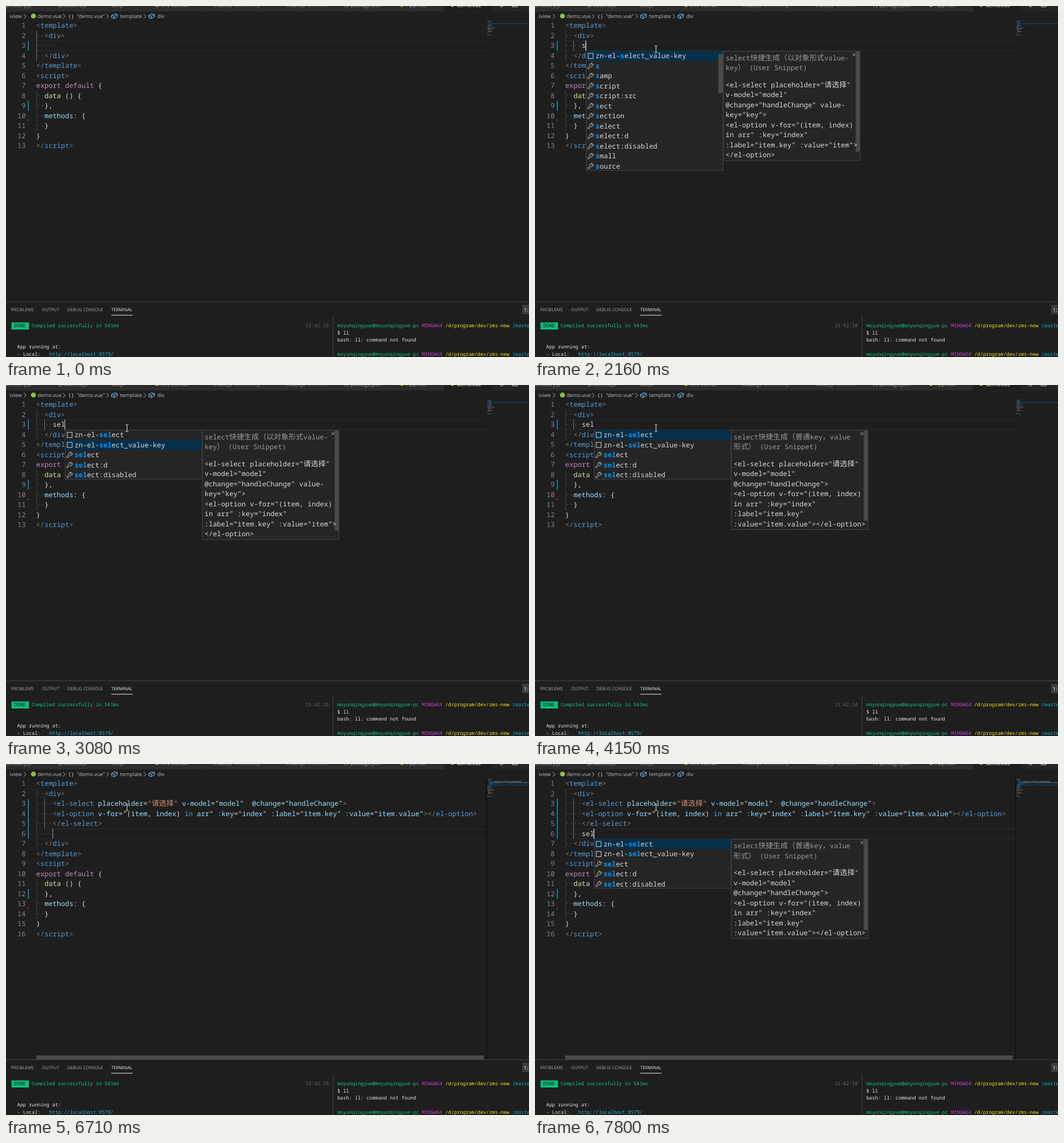
Recreate the animation shown at these times as an HTML page with a canvas. Size 914 px wide and 613 px high, loop 8000 ms.

```html
<!DOCTYPE html>
<html lang="en">
<head>
<meta charset="utf-8">
<title>Snippet completion</title>
<style>
html, body { margin: 0; width: 100%; height: 100%; overflow: hidden; background: #1e1e1e; }
canvas { display: block; }
</style>
</head>
<body>
<canvas id="stage" width="914" height="613"></canvas>
<script>
const ctx = document.getElementById('stage').getContext('2d');
const LOOP = 8000, ROW = 17.5, CODE_X = 52.8, COL = 7.2;
const INSERT = 4610, NEWLINE = 5460;
const MONO = '"Noto Sans Mono", "Noto Sans CJK SC", "Noto Sans CJK", monospace';
const CJK = '"Noto Sans CJK SC", "Noto Sans CJK", sans-serif';
const UI = '"Open Sans", "Noto Sans", sans-serif';
const COLORS = {
  g: '#808080', b: '#569cd6', a: '#9cdcfe', s: '#ce9178',
  w: '#d8d8d8', p: '#c586c0', y: '#dcdcaa', d: '#5a5a5a'
};

// "~k" starts a run in colour k; "·" is a visible space.
const HEAD = ['~g<~btemplate~g>', '~d··~g<~bdiv~g>'];
const TAIL = [
  '~d··~g</~bdiv~g>', '~g</~btemplate~g>', '~g<~bscript~g>',
  '~pexport default ~w{', '~d··~ydata ~w() {', '~d··~w},',
  '~d··~amethods: ~w{', '~d··~w}', '~w}', '~g</~bscript~g>'
];
const SNIPPET = [
  '~d····~g<~bel-select ~aplaceholder~w=~s"请选择" ~av-model~w="~amodel~w"~d··~a@change~w="~ahandleChange~w"~g>',
  '~d····~g<~bel-option ~av-for~w="(~aitem~w, ~aindex~w) ~bin ~aarr~w" ~a:key~w="~aindex~w" ~a:label~w="~aitem.key~w" ~a:value~w="~aitem.value~w"~g></~bel-option~g>',
  '~d····~g</~bel-select~g>'
];
const SUGGESTIONS = [
  'zn-el-select', 'zn-el-select_value-key', 's', 'samp', 'script', 'script:src', 'sect',
  'section', 'select', 'select:d', 'select:disabled', 'small', 'source'
];
const DETAILS = [
  ['select快捷生成（普通key，value', '形式） (User Snippet)', '<el-select placeholder="请选择"',
    'v-model="model"', '@change="handleChange">', '<el-option v-for="(item, index)',
    'in arr" :key="index"', ':label="item.key"', ':value="item.value"></el-option>'],
  ['select快捷生成（以对象形式value-', 'key） (User Snippet)', '<el-select placeholder="请选择"',
    'v-model="model"', '@change="handleChange" value-', 'key="key">',
    '<el-option v-for="(item, index)', 'in arr" :key="index"',
    ':label="item.key" :value="item">', '</el-option>']
];

// Step tracks: [start time, value]
const TYPED = [[0, ''], [2080, 's'], [2310, 'se'], [2455, 'sel'], [INSERT, ''],
  [7250, 's'], [7490, 'se'], [7730, 'sel']];
const QUERY = [[0, ''], [2160, 's'], [2380, 'se'], [2530, 'sel'], [INSERT, ''],
  [7330, 's'], [7570, 'se'], [7800, 'sel']];
const CARET = [[0, 0], [1150, 1], [1780, .66], [1855, .33], [1930, 0], [2080, 1],
  [3080, .7], [3160, 0], [3540, .5], [3620, 1], [4080, .5], [4150, 0], [INSERT, 1],
  [5230, .5], [5300, 0], [NEWLINE, 1], [6080, .66], [6155, .33], [6230, 0],
  [6710, .5], [6780, 1], [7090, .5], [7170, 0], [7250, 1]];

const at = (track, t) => track.reduce((v, [start, next]) => t >= start ? next : v, track[0][1]);
const rowTop = n => 8 + ROW * n;

function rect(x, y, w, h, color) {
  ctx.fillStyle = color;
  ctx.fillRect(x, y, w, h);
}

function dot(x, y, r, color) {
  ctx.fillStyle = color;
  ctx.beginPath();
  ctx.arc(x, y, r, 0, 7);
  ctx.fill();
}

function path(points, color, width = 1, close = false) {
  ctx.strokeStyle = color;
  ctx.lineWidth = width;
  ctx.beginPath();
  points.forEach(([x, y]) => ctx.lineTo(x, y));
  if (close) ctx.closePath();
  ctx.stroke();
}

function label(text, x, y, color, size = 9.1) {
  ctx.font = `${size}px ${UI}`;
  ctx.fillStyle = color;
  ctx.fillText(text, x, y);
}

// Draws on a fixed pitch and returns the x where the text ends.
function mono(text, x, y, color, size = 12, weight = 400) {
  const wide = size * 1.078;
  for (const ch of text) {
    const isWide = ch > '\u2fff';
    if (ch === '·') rect(Math.round(x + 3), Math.round(y - 4.7), 1.5, 1.5, color);
    else if (ch !== ' ') {
      ctx.font = isWide ? `${wide}px ${CJK}` : `${weight} ${size}px ${MONO}`;
      ctx.fillStyle = color;
      ctx.fillText(ch, x, y);
    }
    x += isWide ? wide : size * .6;
  }
  return x;
}

const term = (text, x, y, color) => mono(text, x, y, color, 8.5, 500);
const runs = line => line.split('~').slice(1).map(r => [COLORS[r[0]], r.slice(1)]);

function drawTabs() {
  rect(0, 0, 914, 9.5, '#252526');
  rect(0, 0, 850, 9.5, '#2d2d2d');
  rect(765, 0, 85, 9.5, '#1e1e1e');
  for (const x of [68, 160, 248, 340, 466, 579, 677, 765, 850]) rect(x, 0, 1, 9.5, '#252526');
  const names = [['directory.js', -2], ['problems.js', 92], ['cut.js', 184], ['env-list.vue', 271],
    ['index.js', 363], ['index.js', 490], ['package.json', 602], ['App.vue', 700]];
  for (const [name, x] of names) label(name, x, 1.7, '#969696');
  label('\\zms\\config', 399, 1.7, '#6c6c6c', 8.2);
  label('\\src\\store', 526, 1.7, '#6c6c6c', 8.2);
  label('demo.vue', 788, 1.7, '#ffffff');
  for (const x of [264, 692, 780]) dot(x, -2.5, 4, '#8dc149');
  mono('{}', 590, 1, '#cbcb41', 8.5);
  path([[863, 0], [866, 2], [869, 0]], '#c5c5c5');
  path([[884.5, -2], [884.5, 1.5], [893.5, 1.5], [893.5, -2]], '#c5c5c5');
}

function chevron(x) {
  path([[x - 2, 14], [x + 2, 18], [x - 2, 22]], '#b0b0b0');
}

function cube(x) {
  const blue = '#75beff';
  path([[x, 16.5], [x + 5.5, 13.5], [x + 10, 15], [x + 10, 19], [x + 4.5, 22], [x, 20.5]], blue, 1, true);
  path([[x, 16.5], [x + 4.5, 18], [x + 10, 15]], blue);
  path([[x + 4.5, 18], [x + 4.5, 22]], blue);
}

function drawBreadcrumb(t) {
  const text = '#bcbcbc';
  label('iview', 6.5, 21, text);
  dot(48, 17.5, 4.3, '#8dc149');
  label('demo.vue', 55, 21, text);
  mono('{}', 108.5, 20.8, '#cccccc', 8.8);
  label('"demo.vue"', 124, 21, text);
  label('template', 199.5, 21, text);
  label('div', 264.5, 21, text);
  [33, 101.5, 177.5, 242.5].forEach(chevron);
  cube(184.5);
  cube(249.5);
  if (t >= 4980 && t < 6155) {
    chevron(282.5);
    cube(289.5);
    label('el-select', 304.5, 21, text);
  }
}

function drawMinimap(lines, current) {
  rect(841, 25.8 + (current - 1) * 2, 73, 2, '#153a58');
  ctx.globalAlpha = .65;
  lines.forEach((line, i) => {
    let x = 841;
    for (const [color, text] of runs(line)) {
      for (const ch of text) {
        if (ch !== ' ' && ch !== '·') rect(x, 26 + i * 2, .7, 1.1, color);
        x += .82;
      }
    }
  });
  ctx.globalAlpha = 1;
}

function guide(col, first, last, bright) {
  const y = rowTop(first);
  rect(Math.round(CODE_X + col * COL), y, 1, rowTop(last + 1) - y, bright ? '#707070' : '#404040');
}

function drawEditor(t) {
  const inserted = t >= INSERT, newline = t >= NEWLINE, typed = at(TYPED, t);
  const editLine = '~d····' + (typed ? '~w' + typed : '');
  const body = inserted ? SNIPPET.concat(newline ? editLine : []) : [editLine];
  const lines = [...HEAD, ...body, ...TAIL];
  const current = newline ? 6 : inserted ? 5 : 3;
  const shift = body.length - 1;
  const top = rowTop(current);

  rect(53, top, 788, 1, '#2b2b2b');
  rect(53, top + 17, 788, 1, '#2b2b2b');

  const deep = inserted || typed;
  guide(0, 2, 4 + shift, !deep);
  if (deep) guide(2, 3, newline && !typed ? 5 : current, true);
  guide(0, 8 + shift, 11 + shift, false);

  lines.forEach((line, i) => {
    const y = rowTop(i + 1) + 12.6, number = String(i + 1);
    mono(number, 34.4 - number.length * COL, y, '#858585');
    let x = CODE_X;
    for (const [color, text] of runs(line)) x = mono(text, x, y, color);
  });

  const lastBar = t >= 5700 ? 6 : t >= 4830 ? 5 : 3;
  rect(38, rowTop(3), 2, (lastBar - 2) * ROW, '#0c7d9d');
  rect(38, rowTop(9 + shift), 2, ROW, '#0c7d9d');
  const cut = rowTop(11 + shift) - 1;
  ctx.fillStyle = '#b0201c';
  ctx.beginPath();
  [[38, cut - 2.5], [40.5, cut], [38, cut + 2.5]].forEach(([x, y]) => ctx.lineTo(x, y));
  ctx.fill();

  if (inserted && !newline) {
    ctx.strokeStyle = '#888888';
    ctx.lineWidth = 1;
    for (const col of [4, 15]) ctx.strokeRect(Math.floor(CODE_X + col * COL) + .5, top + .5, 6.5, 16.5);
  }
  drawMinimap(lines, current);
  if (inserted) {
    rect(839, 25, 2, 491, 'rgba(0,0,0,.4)');
    rect(53, 509, 782, 7.5, '#4b4b4b');
  }

  const col = inserted && !newline ? 16 : 4 + typed.length;
  ctx.globalAlpha = at(CARET, t);
  rect(Math.floor(CODE_X + col * COL - .6), top, 1.6, ROW, '#c8c8c6');
  ctx.globalAlpha = 1;
  return current;
}

// An open-jawed ring with a hollow handle running down to the left.
function wrench(x, y) {
  const points = [[8, -1.8], [9.8, -3.6], [10, -1], [8, 1], [5.6, 1], [2, 4.8], [.4, 4.4],
    [.2, 3], [3.8, -.6], [3.8, -3], [5.6, -4.8], [8.2, -4.8], [6.4, -3]];
  path(points.map(([dx, dy]) => [x + dx, y + dy]), '#c5c5c5', 1, true);
}

function panelBox(x, y, w, h) {
  rect(x, y, w, h, '#454545');
  rect(x + 1, y + 1, w - 2, h - 2, '#252526');
}

function drawSuggest(t, current) {
  const query = at(QUERY, t);
  if (!query) return;
  const selected = t < 3770 ? 1 : 0;
  const matches = SUGGESTIONS.filter(s => s.includes(query));
  const scroll = query === 's' ? selected : 0;
  const shown = matches.slice(scroll, scroll + 12);
  const x = Math.round(CODE_X + (4 + query.length) * COL);
  const y = rowTop(current + 1) + .5;

  panelBox(x, y, 240, shown.length * ROW - 1);
  shown.forEach((name, i) => {
    const top = y + i * ROW, base = top + 12.8, mid = top + 8.7;
    if (i + scroll === selected) rect(x + 1, top, 238, ROW, '#062f4a');
    if (name.startsWith('zn-')) {
      ctx.strokeStyle = '#c5c5c5';
      ctx.lineWidth = 1.1;
      ctx.strokeRect(x + 4, mid - 4.5, 8.5, 9);
    } else wrench(x + 3, mid);
    const hit = name.indexOf(query);
    let tx = mono(name.slice(0, hit), x + 16.8, base, '#d8d8d8');
    tx = mono(query, tx, base, '#0097fb', 12, 700);
    mono(name.slice(hit + query.length), tx, base, '#d8d8d8');
  });
  if (matches.length > 12) rect(x + 231.5, y + (scroll ? 5.5 : 0), 7.5, 68, '#4a4a4b');

  const text = DETAILS[t < 3850 ? 1 : 0];
  const h = text.length * ROW + 17, dx = x + 239.5;
  panelBox(dx, y, 240, h);
  rect(dx + 232, y + 1, 7, h - 17, '#4a4a4b');
  text.forEach((line, i) => {
    const base = y + 16 + i * ROW + (i > 1 ? 12 : 0);
    mono(line, dx + 4.5, base, i > 1 ? '#d8d8d8' : '#9a9a9a');
  });
  path([[dx + 226.5, y + 4], [dx + 231.5, y + 9]], '#b0b0b0');
  path([[dx + 231.5, y + 4], [dx + 226.5, y + 9]], '#b0b0b0');
}

function drawPanel() {
  rect(0, 516, 914, 1, '#434343');
  [['PROBLEMS', 9], ['OUTPUT', 63], ['DEBUG CONSOLE', 107]]
    .forEach(([name, x]) => label(name, x, 533, '#a8a8a8', 7.65));
  label('TERMINAL', 184, 533, '#f0f0f0', 7.65);
  rect(184, 539.5, 37.5, 1, '#e7e7e7');
  rect(902, 522, 12, 16, '#3c3c3c');
  label('1:', 905, 533.5, '#f0f0f0', 9);
  rect(571, 542, 1, 71, '#434343');

  const green = '#12c982', white = '#e5e5e5';
  rect(9.6, 552.6, 30.6, 12.4, '#0dbc79');
  term('DONE', 14.2, 561, '#1e1e1e');
  term('Compiled successfully in 541ms', 44.7, 561, green);
  term('15:42:10', 523.3, 561, '#666666');
  term('App running at:', 19.6, 598, white);
  const x = term('- Local:   ', 19.6, 610.5, white);
  term('http://localhost:8579/', x, 610.5, '#29b8db');

  for (const y of [561, 610.5]) {
    let px = term('moyunqingyue@moyunqingyue-pc ', 579, y, green);
    px = term('MINGW64 ', px, y, '#c845c8');
    px = term('/d/program/dev/zms-new ', px, y, '#f0f01a');
    term('(master)', px, y, '#16b4dc');
  }
  term('$ ll', 579, 573.5, white);
  term('bash: ll: command not found', 579, 586, white);
}

function drawPointer(t) {
  if (t < 150) return;
  const p = Math.min(1, Math.floor((t - 150) / 77) / 10);
  const ease = p * p * (3 - 2 * p);
  const x = Math.round(775 - 564 * ease);
  const y = t >= 1000 ? 75 : Math.round(553 - 477 * ease);
  if (t >= 1150 && t < 1320) dot(209, 74, 9, 'rgba(255,255,0,.47)');
  rect(x, y - 5, 1, 11, '#e8e8e8');
  for (const dy of [-6, 6]) {
    rect(x - 2, y + dy, 2, 1, '#e8e8e8');
    rect(x + 1, y + dy, 2, 1, '#e8e8e8');
  }
}

function render(t) {
  rect(0, 0, 914, 613, '#1e1e1e');
  drawTabs();
  drawBreadcrumb(t);
  const current = drawEditor(t);
  drawPanel();
  drawSuggest(t, current);
  drawPointer(t);
}

ctx.textRendering = 'geometricPrecision';
const began = performance.now();
function tick() {
  render((performance.now() - began) % LOOP);
  requestAnimationFrame(tick);
}
tick();
</script>
</body>
</html>
```
